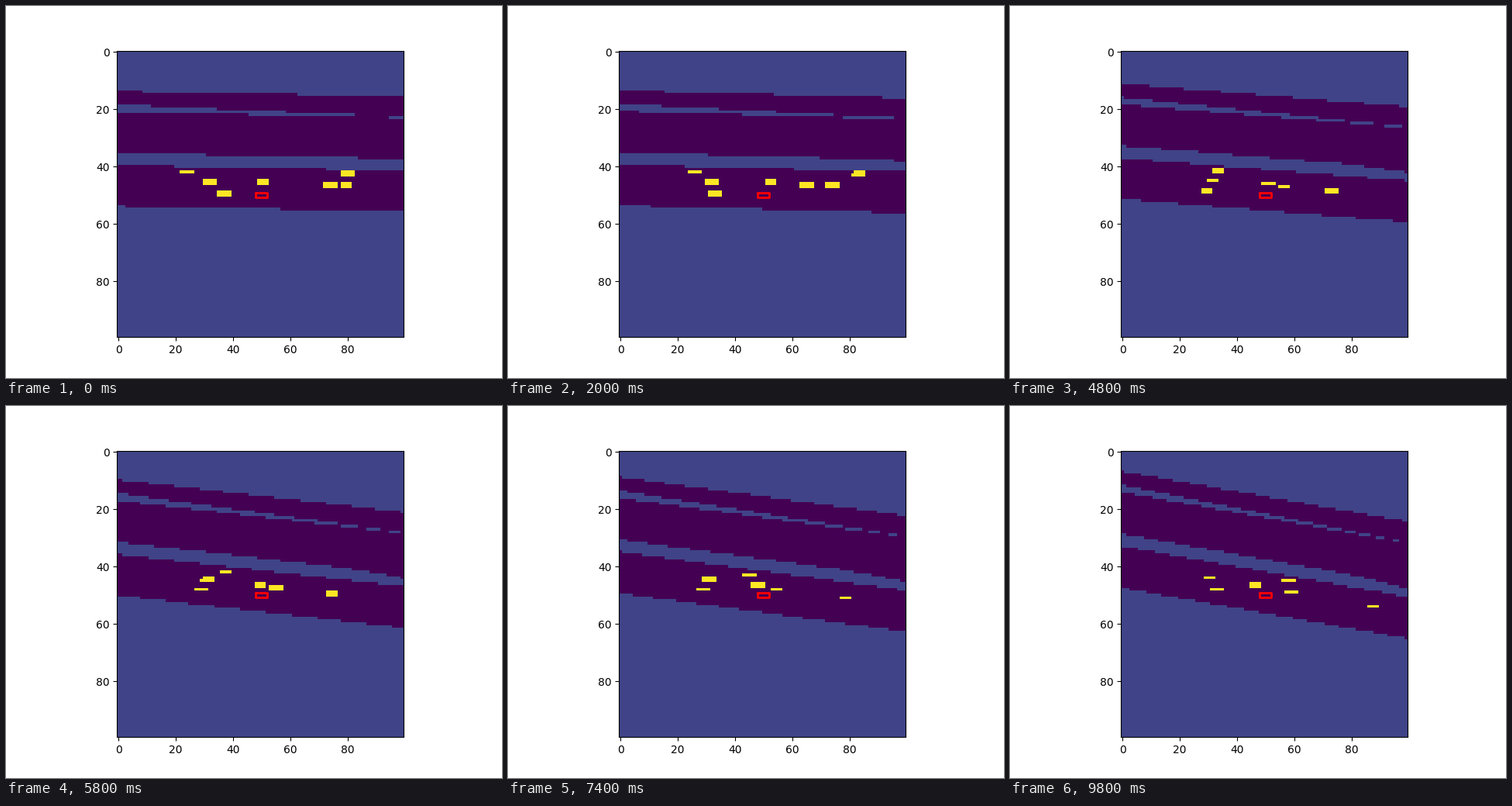
A matplotlib script for the animation above (9900 ms loop, 640 by 480 pixels).

```python
import matplotlib.pyplot as plt
import numpy as np
from matplotlib.animation import FuncAnimation

N = 100
MID = N / 2              # the ego car sits in the middle of the grid
STEP = 2                 # ticks per simulation state
TICKS = 99
DARK, BLUE, YELLOW = 0.0, 0.2, 1.0
SIGHT = 39.5             # cars further ahead than this are not seen
HALF_LEN, HALF_WID = 2.25, 0.75

# The road's slope and sideways drift as the ego car turns.
KEYS = [0, 10, 17, 24, 29, 37, 42, 49]
TURN = [0.0187, 0.026, 0.036, 0.08, 0.113, 0.135, 0.168, 0.177]
DRIFT = [0, 0.14, 0.3, 0.58, 0.92, 1.2, 1.33, 1.43]

# Distance of each road edge from the ego car, in rows.
ROAD_TOP, ROAD_BOTTOM = -34.22, 5.88
STRIP_TOP, STRIP_BOTTOM = -28.36, -26.91
MEDIAN_TOP, MEDIAN_BOTTOM = -12.63, -8.42

# Lane of each car and its column at four times.
TIMES = [0, 17, 29, 49]
CARS = [
    (-7.75, [24, 29, 37.5, 58]),
    (-4.13, [32, 31.6, 31.2, 30.4]),
    (-0.43, [37.2, 31, 28.9, 33]),
    (-4.47, [50.5, 52, 49.7, 46.5]),
    (-4.02, [74, 60, 55, 59]),
    (-4.15, [79.5, 72.5, 74.5, 87.75]),
    (-8.28, [80, 86.5, 93, 103]),
]

rows, cols = np.mgrid[:N, :N]


def scene(s):
    turn = np.interp(s, KEYS, TURN)
    drift = np.interp(s, KEYS, DRIFT)

    def below(offset, fan=0.0, taper=0.0):
        """Cells under a road edge; fan adds slope, taper bends the far end."""
        y = MID + drift + offset * np.hypot(1, turn) + (turn + fan) * (cols - MID)
        y = y + taper * np.maximum(0, cols - max(78, N - s))
        return rows >= np.floor(y)

    grid = np.full((N, N), BLUE)
    grid[below(ROAD_TOP) & ~below(ROAD_BOTTOM)] = DARK
    grid[below(STRIP_TOP, fan=0.0235) & ~below(STRIP_BOTTOM, fan=0.002)] = BLUE
    grid[below(MEDIAN_TOP, taper=0.06) & ~below(MEDIAN_BOTTOM)] = BLUE

    for lane, xs in CARS:
        x = np.polyval(np.polyfit(TIMES, xs, 3), s)
        if x - MID > SIGHT:
            continue
        dy = rows - (MID + drift + lane + turn * (x - MID))
        dx = cols - x + turn * dy
        grid[(abs(dx) <= HALF_LEN) & (abs(dy) <= HALF_WID)] = YELLOW
    return grid


fig, ax = plt.subplots(figsize=(6.4, 4.8), dpi=100)
image = ax.imshow(scene(0), cmap="viridis", vmin=0, vmax=1)
ax.plot([48, 52, 52, 48, 48], [49.2, 49.2, 50.8, 50.8, 49.2],
        color="red", lw=2, solid_capstyle="round")


def update(tick):
    image.set_data(scene(tick // STEP))
    return [image]


anim = FuncAnimation(fig, update, frames=TICKS, interval=100,
                     repeat=True, repeat_delay=0)
plt.show()
```
